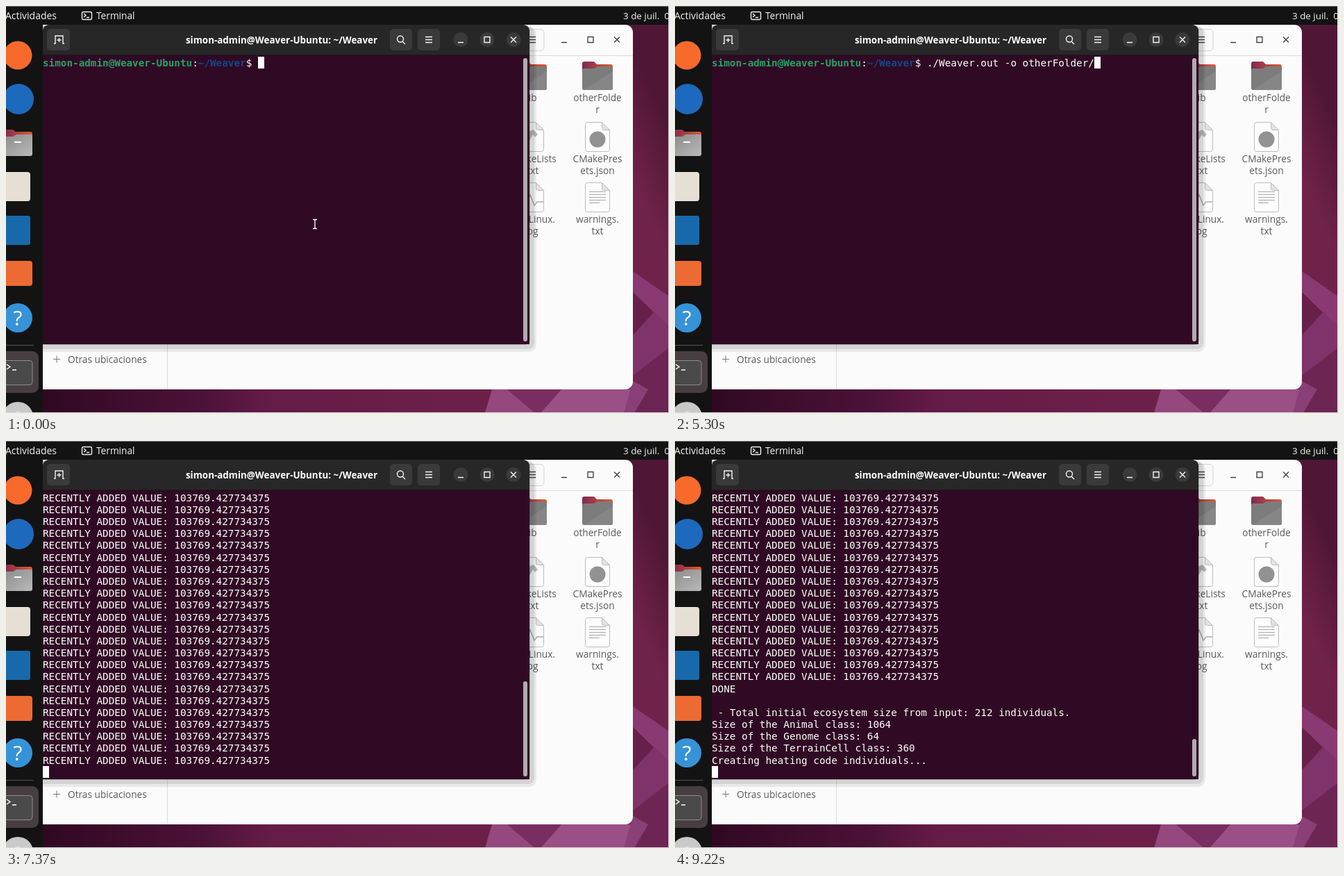
These frames come from a looping animation (955x586 px, 9240 ms). An HTML page:

```html
<!DOCTYPE html>
<html lang="es">
<head>
<meta charset="utf-8">
<title>Terminal</title>
<style>
  html, body { margin: 0; width: 100%; height: 100%; overflow: hidden; background: #131313; }
  svg { display: block; width: 955px; height: 586px; }
  text { font: 13.7px "Open Sans", "Noto Sans", sans-serif; white-space: pre; }
  .bold { font-weight: 700; }
  .mid { text-anchor: middle; }
  .end { text-anchor: end; }
  .label { fill: #5a5a5a; }
  .row { font: 14.3px "DejaVu Sans Mono", monospace; fill: #fff; }
  .user { fill: #26a269; font-weight: 700; }
  .path { fill: #12488b; font-weight: 700; }
  .line { fill: none; stroke-width: 1.4; }
</style>
</head>
<body>
<svg viewBox="0 0 955 586">
  <defs>
    <linearGradient id="sky" gradientUnits="userSpaceOnUse" x1="895" y1="230" x2="965" y2="200">
      <stop offset="0" stop-color="#70234a"/>
      <stop offset="1" stop-color="#501636"/>
    </linearGradient>
    <linearGradient id="ground" gradientUnits="userSpaceOnUse" x1="52" y1="0" x2="640" y2="0">
      <stop offset="0" stop-color="#300822"/>
      <stop offset=".4" stop-color="#4c1237"/>
      <stop offset=".55" stop-color="#641b45"/>
      <stop offset="1" stop-color="#6c2049"/>
    </linearGradient>
    <linearGradient id="flap">
      <stop offset="0" stop-color="#7d2a52"/>
      <stop offset="1" stop-color="#e2592d"/>
    </linearGradient>
    <linearGradient id="steel" x1="0" y1="0" x2="1" y2="1">
      <stop offset="0" stop-color="#8b8b8b"/>
      <stop offset="1" stop-color="#b9b9b9"/>
    </linearGradient>
    <g id="folder">
      <path d="M-22 3q0-3 3-3h14l4 4h20q3 0 3 3v20h-44z" fill="url(#flap)"/>
      <path d="M-22 13q0-3 3-3h14l5-3h19q3 0 3 3v28q0 3-3 3h-38q-3 0-3-3z" fill="#7c7c7c"/>
      <path d="M-20 41L22 14v24q0 3-3 3z" fill="#868686"/>
    </g>
    <g id="sheet">
      <path d="M-17.5 3.500q0-3 3-3h21l11 11v28q0 3-3 3h-29q-3 0-3-3z" fill="#fdfdfd" stroke="#bcbcbc"/>
      <path d="M6.500 .5v8q0 3 3 3h8z" fill="#e2e2e2" stroke="#bcbcbc"/>
    </g>
    <g id="winkeys" class="line">
      <path d="M-42 4h8M-4-4h8v8h-8zM34-4l8 8m0-8l-8 8"/>
    </g>
  </defs>

  <!-- wallpaper -->
  <rect x="880" y="27" width="75" height="559" fill="url(#sky)"/>
  <rect y="540" width="900" height="46" fill="url(#ground)"/>
  <path d="M903 382L955 418V470L903 440z" fill="#8a3972"/>
  <path d="M903 412L955 462V500L903 470z" fill="#672049"/>
  <path d="M903 474L934 440L955 462V520L903 540z" fill="#80336a"/>
  <path d="M903 532L955 492V586H880z" fill="#6d2553"/>
  <path d="M700 552H722L762 586H690z" fill="#94487d"/>
  <path d="M722 552H800L770 586H762z" fill="#7a2d60"/>
  <path d="M800 552H903L890 586H770z" fill="#9a5084"/>
  <path d="M903 540L925 552 905 586H890z" fill="#8a3f76"/>

  <!-- file manager -->
  <rect x="40" y="27" width="863" height="525" rx="11" fill="#fbfbfb"/>
  <path d="M754 71.500H903M232.500 487V552" stroke="#dcdcdc"/>
  <rect x="741" y="33.500" width="34" height="31" rx="5" fill="#fafafa" stroke="#d3d3d3"/>
  <path d="M753 44.500h10m-10 4h10m-10 4h10" stroke="#444" stroke-width="1.400"/>
  <use href="#winkeys" x="842" y="48.500" stroke="#444"/>
  <path d="M68 508.500h10m-5-5v10" stroke="#777"/>
  <text class="label" x="89" y="513.500">Otras ubicaciones</text>
  <use href="#folder" x="757" y="80"/>
  <use href="#folder" x="852" y="80"/>
  <use href="#sheet" x="757" y="167"/>
  <use href="#sheet" x="852" y="167"/>
  <use href="#sheet" x="757" y="254"/>
  <use href="#sheet" x="852" y="254"/>
  <path d="M752 181l8-3 6 7-4 4-3-4-8 14-4-3z" fill="#bbb"/>
  <circle cx="852" cy="192" r="11.500" fill="#929292"/>
  <path class="line" d="M743 282h8l4-10 6 15 4-5h9" stroke="#aaa"/>
  <path d="M840 267.500h24m-24 4h24m-24 4h24m-24 4h24m-24 4h15" stroke="#a5a5a5"/>
  <g class="label mid">
    <text x="757" y="137">lib</text>
    <text x="852" y="137">otherFolde</text><text x="852" y="153.500">r</text>
    <text x="757" y="225">CMakeLists</text><text x="757" y="241.500">.txt</text>
    <text x="852" y="225">CMakePres</text><text x="852" y="241.500">ets.json</text>
    <text class="end" x="791" y="312">Linux.</text><text x="757" y="328.500">log</text>
    <text x="852" y="312">warnings.</text><text x="852" y="328.500">txt</text>
  </g>

  <!-- terminal window -->
  <g fill="#000">
    <rect x="40" y="30" width="724" height="468" rx="11" opacity=".07"/>
    <rect x="40" y="29" width="721" height="465" rx="9" opacity=".09"/>
    <rect x="40" y="28" width="715" height="460" rx="8" opacity=".2"/>
  </g>
  <path d="M53 487V38q0-11 11-11H743q11 0 11 11V487z" fill="#300a24"/>
  <path d="M53 71V38q0-11 11-11H743q11 0 11 11V71z" fill="#272727"/>
  <path d="M53 70.500H754" stroke="#1b1b1b"/>
  <g fill="#3a3a3a">
    <rect x="59" y="33" width="33" height="31" rx="5"/>
    <rect x="553" y="33" width="32" height="31" rx="5"/>
    <rect x="593" y="33" width="32" height="31" rx="5"/>
    <circle cx="655" cy="48.500" r="10.500"/><circle cx="693" cy="48.500" r="10.500"/><circle cx="731" cy="48.500" r="10.500"/>
  </g>
  <g class="line" stroke="#f5f5f5">
    <path d="M69 54h2V43h11v11h2M76.500 46v6m-3-3h6M604 44.500h10m-10 4h10m-10 4h10"/>
    <circle cx="568" cy="47.500" r="4.500"/><path d="M571 51l4 4"/>
    <use href="#winkeys" x="693" y="48.500"/>
  </g>
  <text class="bold mid" x="397" y="53.500" fill="#fff" style="font-size:13.400px">simon-admin@Weaver-Ubuntu: ~/Weaver</text>
  <g id="screen"></g>
  <rect id="caret" width="8.600" height="17" fill="#fff" shape-rendering="crispEdges"/>
  <rect id="bar" x="745" width="6" rx="3" fill="#b3aab0"/>

  <!-- top bar and dock -->
  <path d="M0 0H955V27H53V586H0z" fill="#131313"/>
  <g fill="#f2f2f2">
    <text x="-1" y="19" style="font-size:14px">Actividades</text>
    <text x="130" y="19">Terminal</text>
    <text x="889" y="19" style="font-size:13.400px">3 de juil.  0</text>
  </g>
  <rect class="line" x="109.500" y="8.500" width="14" height="11" rx="2" stroke="#eee"/>
  <path class="line" d="M112 11l3 2.500-3 2.500m4 .5h4" stroke="#eee"/>
  <circle cx="17" cy="71" r="20.500" fill="#f76a2c"/>
  <circle cx="18" cy="134" r="22" fill="#1d69bd"/>
  <path d="M-4 178H10l4 3H35q3 0 3 3v18H-4z" fill="url(#flap)"/>
  <path d="M-4 188H10l5-3H35q3 0 3 3v25q0 3-3 3H-4z" fill="url(#steel)"/>
  <path d="M12 196H22" stroke="#fff" stroke-width="2"/>
  <rect x="-6" y="239" width="41" height="42" rx="4" fill="#e6dfd3"/>
  <rect x="-6" y="302" width="41" height="42" rx="3" fill="#1769aa"/>
  <rect x="-4" y="367" width="42" height="36" rx="4" fill="#ed6a33"/>
  <circle cx="17" cy="449" r="21" fill="#3693d8"/>
  <text class="mid" x="17" y="459.500" fill="#fff" style="font-size:30px">?</text>
  <path d="M0 488.500H40" stroke="#555"/>
  <rect x="-10" y="497" width="57" height="60" rx="9" fill="#473e42"/>
  <rect x="-6" y="510.500" width="44" height="35" rx="4" fill="#4a4a4a" stroke="#8c8c8c"/>
  <path class="line" d="M1 516l5 3.500-5 3.500m8 1h6" stroke="#fff"/>
  <ellipse cx="17" cy="591" rx="22" ry="21" fill="#c9c9c9"/>
  <circle cx="17" cy="591" r="7" fill="#eee"/>

  <!-- light rim of the screen -->
  <path d="M0 .5H955" stroke="#6a6a6a"/>
  <path d="M954.500 0V585.500H0" fill="none" stroke="#dcdcdc"/>

  <path id="beam" d="M-3-6.500h2.200L0-5.500 .8-6.500H3M0-5.500v11M-3 6.500h2.200L0 5.500 .8 6.500H3" fill="none" stroke="#fff" stroke-width="1.300"/>
  <path id="arrow" d="M0 0v16l4-3.500 2.500 6 2.500-1-2.500-6H12z" fill="#111" stroke="#fff"/>
</svg>
<script>
const LOOP = 9240, LEFT = 53, TOP = 73, COL = 8.61, PITCH = 17.18;
const $ = id => document.getElementById(id);
const prompt = '<tspan class="user">simon-admin@Weaver-Ubuntu</tspan>:<tspan class="path">~/Weaver</tspan>$ ';
const promptCols = 36;
const command = './Weaver.out -o otherFolder';

// [time, typed text]
const typing = [
  [0, ''], [900, '.'], [1300, './'], [1890, './W'], [2040, './We'],
  [2280, './Weaver.out '], [3490, './Weaver.out -'], [3830, './Weaver.out -o'],
  [4320, './Weaver.out -o '], [4750, './Weaver.out -o o'], [4990, './Weaver.out -o ot'],
  [5110, './Weaver.out -o oth'], [5300, command + '/'], [6350, command]
];

// [time, lines printed, scrollbar top]
const printing = [
  [6940, 0, 75], [7090, 3, 75], [7130, 5, 75], [7180, 6, 75],
  [7240, 8, 75], [7280, 10, 75], [7320, 16, 179], [7350, 70, 346], [7410, 180, 429]
];
const hidden = [[2840, 3430], [5860, 6320], [7460, 8070], [8660, 9220]];

const rule = '='.repeat(47);
const intro = [
  rule, 'Reading configuration and initializing world...', rule, '',
  'Reading all resource species from JSON files ...',
  ' - Resource scientific name: alternative', '',
  ' - Resource scientific name: ferns', '',
  'Reading all animal species from JSON files ...',
  "[WARNING] Item 'instarFirstReproduction' is not being used because 'indeterminat",
  "eGrowth' is disabled",
  "[WARNING] Item 'defaultOntogeneticValue.preference' is not being used because 'g",
  "lobalPreference' is defined",
  ' - Animal scientific name: Edmontosaurus_sp',
  'numberOfInstars: 20'
];
const summary = [
  'DONE', '', ' - Total initial ecosystem size from input: 212 individuals.',
  'Size of the Animal class: 1064', 'Size of the Genome class: 64',
  'Size of the TerrainCell class: 360', 'Creating heating code individuals...'
];
const values = Array(180 - intro.length - summary.length).fill('RECENTLY ADDED VALUE: 103769.427734375');
const output = [...intro, ...values, ...summary];

const rows = Array.from({ length: 24 }, (_, i) => {
  const row = document.createElementNS('http://www.w3.org/2000/svg', 'text');
  row.setAttribute('class', 'row');
  row.setAttribute('x', LEFT);
  row.setAttribute('y', Math.round(TOP + 13.7 + i * PITCH));
  return $('screen').appendChild(row);
});

const latest = (steps, t) => steps.filter(s => s[0] <= t).pop();
const show = (el, on) => el.setAttribute('visibility', on ? 'visible' : 'hidden');
const move = (el, x, y) => el.setAttribute('transform', `translate(${x} ${y})`);

let shown = '';
function drawScreen(t) {
  const typed = latest(typing, t)[1];
  const [, count, barTop] = latest(printing, t) || [0, -1, 75];
  const key = typed + count;
  if (key !== shown) {
    shown = key;
    const lines = [prompt + typed, ...output.slice(0, Math.max(count, 0))].slice(-23);
    rows.forEach((row, i) => { row.innerHTML = lines[i] || ''; });
    const line = count < 0 ? 0 : lines.length;
    const col = count < 0 ? promptCols + typed.length : 0;
    $('caret').setAttribute('x', LEFT + col * COL);
    $('caret').setAttribute('y', Math.round(TOP + line * PITCH));
    $('bar').setAttribute('y', barTop);
    $('bar').setAttribute('height', 483 - barTop);
  }
  show($('caret'), !hidden.some(([a, b]) => t >= a && t < b));
}

// The pointer rests, hides while typing, then leaves to the lower right.
function drawPointer(t) {
  const resting = t < 950, leaving = t >= 8440 && t < 8760;
  let x = 445, y = 314;
  if (leaving) {
    const p = Math.floor((t - 8440) / 29) / 11;
    x = 447 + 430 * p;
    y = 331 + 262 * p;
  }
  const inside = x < 754 && y < 487;
  show($('beam'), (resting || leaving) && inside);
  show($('arrow'), leaving && !inside);
  move($('beam'), x, y);
  move($('arrow'), x, y);
}

const start = performance.now();
function frame() {
  const t = (performance.now() - start) % LOOP;
  drawScreen(t);
  drawPointer(t);
  requestAnimationFrame(frame);
}
frame();
</script>
</body>
</html>
```
